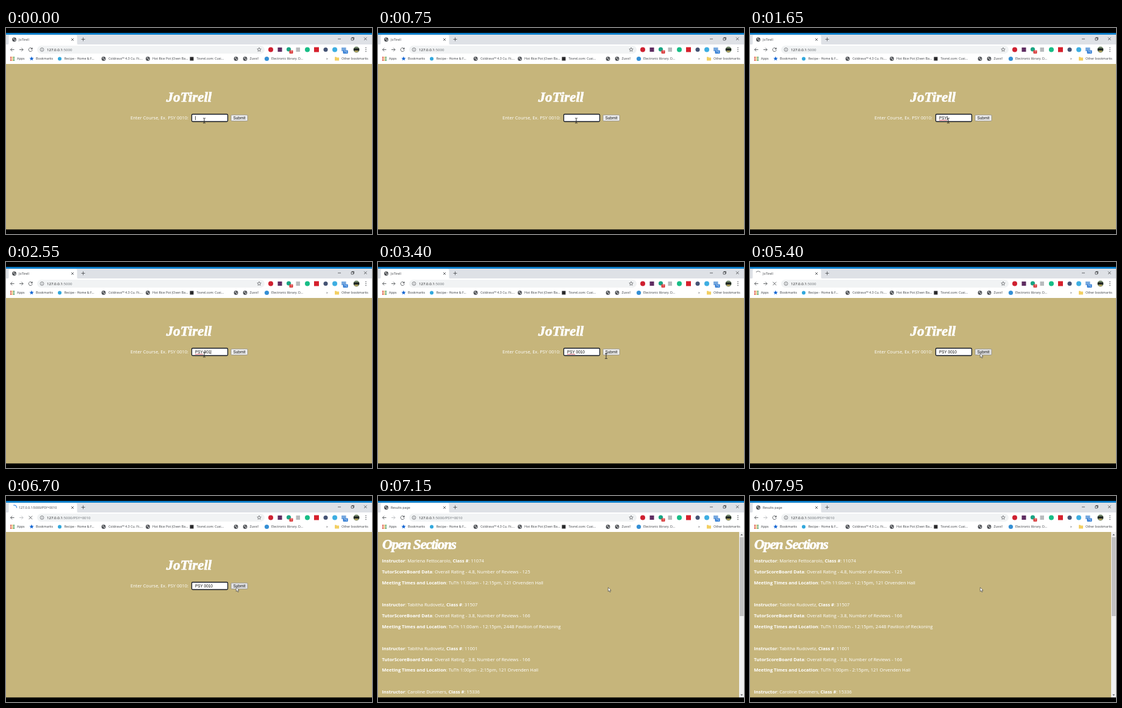
These frames come from a looping animation (600x338 px, 8 s). An HTML page:

```html
<!DOCTYPE html>
<html lang="en">
<head>
<meta charset="utf-8">
<title>Course search</title>
<style>
  html, body { margin: 0; width: 100%; height: 100%; overflow: hidden; background: #000; }
  svg { display: block; width: 100%; height: 100%; }
  text { white-space: pre; }
  .ui { font-family: "Noto Sans", "Open Sans", sans-serif; fill: #45484c; }
  .body { font: 7.5px "Open Sans", "Noto Sans", sans-serif; fill: #fff; }
  .form { font: 6.45px "Liberation Sans", Arial, sans-serif; fill: #111; }
  .logo { font: italic 700 23px "Liberation Serif", "Times New Roman", serif;
          fill: #fff; stroke: #fff; stroke-width: .7; }
  .line { fill: none; stroke: #55585c; stroke-width: .9; }
</style>
</head>
<body>
<svg id="stage" viewBox="0 0 600 338"></svg>
<script>
const LOOP = 8000, STEP = 50;
const CLICK = 4000, COMMIT = 6600, PAINT = 6750, DONE = 6800;
const KEYS = [850, 1050, 1250, 1900, 2100, 2300, 2500, 2700];
const COURSE = "PSY 0010";
const TAN = "#c6b57b";

const rect = (x, y, w, h, fill, more = "") =>
  `<rect x="${x}" y="${y}" width="${w}" height="${h}" fill="${fill}" ${more}/>`;
const dot = (x, y, r, fill) => `<circle cx="${x}" cy="${y}" r="${r}" fill="${fill}"/>`;
const line = (d, more = "") => `<path class="line" d="${d}" ${more}/>`;
const ui = (x, y, s, size = 5.3, more = "") =>
  `<text class="ui" x="${x}" y="${y}" font-size="${size}" ${more}>${s}</text>`;
const globe = (x, y) => dot(x, y, 3.4, "#505357") +
  `<path d="M${x - 2} ${y - 1.6}l1.8-.7 .5 1.2-1.2 1.2zM${x + .6} ${y + .3}l1.7-.3-.6 1.8-1.3.4z" fill="#e9eaeb"/>`;
const star = (x, y, r, more) => {
  const pts = Array.from({ length: 10 }, (_, i) => {
    const a = i * Math.PI / 5, q = i % 2 ? r * .45 : r;
    return `${(x + q * Math.sin(a)).toFixed(2)},${(y - q * Math.cos(a)).toFixed(2)}`;
  });
  return `<polygon points="${pts.join(" ")}" ${more}/>`;
};
const badge = (x, y, w, s, fill) => rect(x, y, w, 5.6, fill, 'rx="1"') +
  ui(x + w / 2, y + 4.5, s, 4.6, 'text-anchor="middle" style="fill:#fff"');

function frame() {
  return rect(0, 0, 600, 338, "#000") + rect(0, 8, 600, 4, "#0d7fcb") +
    rect(0, 11, 600, 17, "#dee1e6") + rect(0, 27, 600, 32, "#fff") +
    '<path d="M2 27.5q2.5 0 2.5-3V14q0-2.5 2.5-2.5H114q2.5 0 2.5 2.5v10.500q0 3 2.500 3z" fill="#fff"/>' +
    line("M107 17l4 4m0-4l-4 4M123.500 18.500h6m-3-3v6") +
    line("M544 18h5M566 16.500h3.500v3.500h-3.500zM567 16.500v-1h3.500v3.500h-1M587 15.500l4.500 4.500m0-4.500l-4.500 4.500", 'stroke-width=".7"') +
    line("M13.500 35.500H7.500m2.700-2.800l-2.800 2.800 2.800 2.800") +
    rect(51, 29, 373, 13, "#f1f3f4", 'rx="6.5"') +
    '<circle class="line" cx="59" cy="35.500" r="2.900" style="stroke-width:.7"/>' +
    line("M59 35v2m0-3.500v.7", 'style="stroke-width:.7"') +
    star(415, 35.500, 3.4, 'class="line" style="stroke-width:.7"');
}

function extensions() {
  return dot(434, 35.500, 4, "#cf2030") + rect(445.500, 32, 7, 7, "#5f2d62") +
    dot(463.500, 35, 3.600, "#1aa584") + badge(464.500, 36.500, 6, "7", "#d93b3b") +
    rect(475.500, 32, 6.500, 7, "#b9bcbe") + dot(494, 35.500, 4, "#17bd86") +
    rect(505, 31.500, 8, 8, "#d6202c") + dot(524, 35.500, 3.500, "#445374") +
    dot(539, 35.500, 4, "#3daee2") + rect(550, 32, 7.500, 6, "#78a9df") +
    badge(552.500, 36.500, 8, "76", "#2877d2") +
    dot(574.500, 35.500, 5, "#71866a") + rect(570, 33.500, 9, 3.500, "#202622") +
    rect(572, 37, 5, 2.500, "#b4a15b") +
    [32.500, 35.500, 38.500].map(y => dot(590, y, .8, "#505357")).join("");
}

function bookmarks() {
  const colors = ["#d9453d", "#e2a33c", "#3b9656", "#4a83d8"];
  let s = "";
  for (let i = 0; i < 9; i++)
    s += rect(7 + i % 3 * 2.5, 47.2 + Math.floor(i / 3) * 2.5, 1.8, 1.8, colors[(i + Math.floor(i / 3)) % 4]);
  s += star(42, 50.300, 3.800, 'fill="#1768d4"') + dot(88, 50.500, 3, "#31a8dd") +
    rect(301.500, 47.500, 6, 6, "#29292b") + dot(427.500, 50.500, 3.600, "#348fd5") +
    '<path d="M539 47.500h2.500l1 1h3.500v5h-7z" fill="#f3cf62"/>';
  s += [160, 232.500, 377, 392].map(x => globe(x, 50.500)).join("");
  const names = [[18, "Apps"], [49, "Bookmarks"], [95.5, "Recipe - Home &amp; F..."],
    [168, "Coldrava™ 4.3 Cu. Ft...."], [240, "Hot Rice Pot (Oven Ba..."],
    [312.5, "Tovrel.com: Cusi..."], [399.5, "Zuvvi!"], [435, "Electronic library. D..."],
    [525, "»"], [550, "Other bookmarks"]];
  return s + names.map(([x, n]) => ui(x, 52.4, n)).join("");
}

function searchPage() {
  return rect(0, 59, 600, 271.500, TAN) +
    '<text class="logo" x="300" y="120.500" text-anchor="middle">JoTirell</text>' +
    '<text class="body" x="204" y="149.500">Enter Course, Ex. PSY 0010:</text>' +
    rect(304.5, 141.5, 59, 12, "#fff", 'rx="1.5" stroke="#111722" stroke-width="1.3"') +
    '<text id="typed" class="form" x="310" y="149.800"></text>' +
    '<path id="squiggle" d="M310 151.300h13" stroke="#d8394a" stroke-width=".8"/>' +
    '<path id="caret" stroke="#222" stroke-width=".8"/>' +
    rect(369, 142.800, 27, 9.700, "#efefef", 'id="button" rx="1" stroke="#767676" stroke-width=".6"') +
    '<text class="form" x="382.500" y="149.900" text-anchor="middle">Submit</text>';
}

function resultsPage() {
  const rating = n => `Overall Rating - ${n}, Number of Reviews - `;
  const rows = [
    ["Marlena Fettocarolo", 11074, rating(4.8) + 125, "TuTh 11:00am - 12:15pm, 121 Orvenden Hall"],
    ["Tabitha Rudovetz", 31507, rating(3.8) + 166, "TuTh 11:00am - 12:15pm, 244B Pavilion of Reckoning"],
    ["Tabitha Rudovetz", 11001, rating(3.8) + 166, "TuTh 1:00pm - 2:15pm, 121 Orvenden Hall"],
    ["Caroline Dunmers", 15336]];
  const bold = s => `<tspan font-weight="700">${s}</tspan>: `;
  const row = (y, s) => `<text class="body" x="6.500" y="${y}">${s}</text>`;
  let s = rect(0, 59, 592, 271.5, TAN) +
    '<text class="logo" x="7" y="86.500" letter-spacing="-1.200">Open Sections</text>';
  rows.forEach(([who, id, score, place], i) => {
    const y = 109.4 + i * 71.6;
    s += row(y, bold("Instructor") + who + ", " + bold("Class #") + id);
    if (score) s += row(y + 17.9, bold("TutorScoreBoard Data") + score) +
      row(y + 35.8, bold("Meeting Times and Location") + place);
  });
  return s + rect(592, 59, 8, 271.5, "#f1f1f1") + rect(593, 67.5, 6.5, 129.5, "#c1c1c1") +
    '<path d="M594.200 64.500h4l-2-2.200zM594.200 325.500h4l-2 2.200z" fill="#55585c"/>';
}

const stage = document.getElementById("stage");
stage.innerHTML = frame() + extensions() + bookmarks() +
  line("M22 35.500h6m-2.700-2.800l2.800 2.800-2.800 2.800", 'id="forward"') +
  `<g id="reload">${line("M42.300 33.500a3 3 0 1 0 .8 2.500")}<path d="M43.500 31.800v3.200h-3.200z" fill="#55585c"/></g>` +
  line("M37.500 32.700l5.500 5.500m0-5.500l-5.500 5.500", 'id="stop"') +
  `<g id="icon">${globe(13.5, 19)}</g>` +
  '<path id="spinner" d="M10.030 16.970A4 4 0 0 1 16.970 16.970" fill="none" stroke-width="1"/>' +
  ui(21, 21.2, "", 5.3, 'id="title"') +
  ui(67, 37.9, '<tspan fill="#202124">127.0.0.1</tspan><tspan id="path" fill="#70757a"></tspan>', 6.1) +
  `<g id="search">${searchPage()}</g><g id="results">${resultsPage()}</g>` +
  '<path id="beam" d="M-2-4h1.500l.5.500.5-.5H2M0-3.500v7M-2 4h1.500l.5-.5.5.5H2" fill="none" stroke="#222" stroke-width=".9"/>' +
  '<path id="arrow" d="M0 0v6.600l1.600-1.400 1.100 2.500 1.200-.5-1.100-2.400h2.100z" fill="#fff" stroke="#333" stroke-width=".6"/>';

const el = {};
stage.querySelectorAll("[id]").forEach(n => el[n.id] = n);
const show = (n, on) => n.setAttribute("visibility", on ? "visible" : "hidden");
const write = (n, s) => { if (n.textContent !== s) n.textContent = s; };
const move = (n, x, y) => n.setAttribute("transform", `translate(${x} ${y})`);
const ease = (t, from, to) => {
  const k = Math.min(1, Math.max(0, (t - from) / (to - from)));
  return k * k * (3 - 2 * k);
};

function draw(t) {
  const loading = t >= CLICK && t < DONE, sent = t >= COMMIT, painted = t >= PAINT;
  show(el.icon, !loading);
  show(el.spinner, loading);
  show(el.stop, loading);
  show(el.reload, !loading);
  // Grey turns backwards while waiting, blue forwards while receiving.
  const angle = sent ? 40 + (t - 6700) * .36 : -90 - (t - 4550) * .318;
  el.spinner.setAttribute("transform", `rotate(${angle} 13.5 19)`);
  el.spinner.setAttribute("stroke", sent ? "#2a7de1" : "#8a8d91");
  el.forward.style.stroke = sent ? "#b9bcbf" : "#55585c";
  write(el.title, t >= DONE ? "Results page" : sent ? "127.0.0.1:5000/PSY+0010" : "JoTirell");
  write(el.path, sent ? ":5000/PSY+0010" : ":5000");
  show(el.search, !painted);
  show(el.results, painted);

  const count = KEYS.filter(k => t >= k).length;
  write(el.typed, COURSE.slice(0, count));
  const last = count ? KEYS[count - 1] : 0;
  const blink = Math.floor((t - last) / 530) % 2 === 0;
  const x = 310.5 + (count ? el.typed.getComputedTextLength() : 0);
  el.caret.setAttribute("d", `M${x} 144.500v6.500`);
  show(el.caret, blink && t < CLICK && !painted);
  show(el.squiggle, t >= 1500 && t < CLICK);

  const over = t >= 3450;
  show(el.beam, !over);
  show(el.arrow, over);
  const k = ease(t, 2850, 3400), j = ease(t, 3400, 3700);
  move(el.beam, 325 + 49 * k, 152 + 2.5 * k);
  move(el.arrow, 374 + 3.3 * j, 152 - 2 * j);
  el.button.setAttribute("fill", over ? "#e2e2e4" : "#efefef");
}

function tick() {
  draw(Math.floor(performance.now() % LOOP / STEP) * STEP);
  requestAnimationFrame(tick);
}
tick();
</script>
</body>
</html>
```
